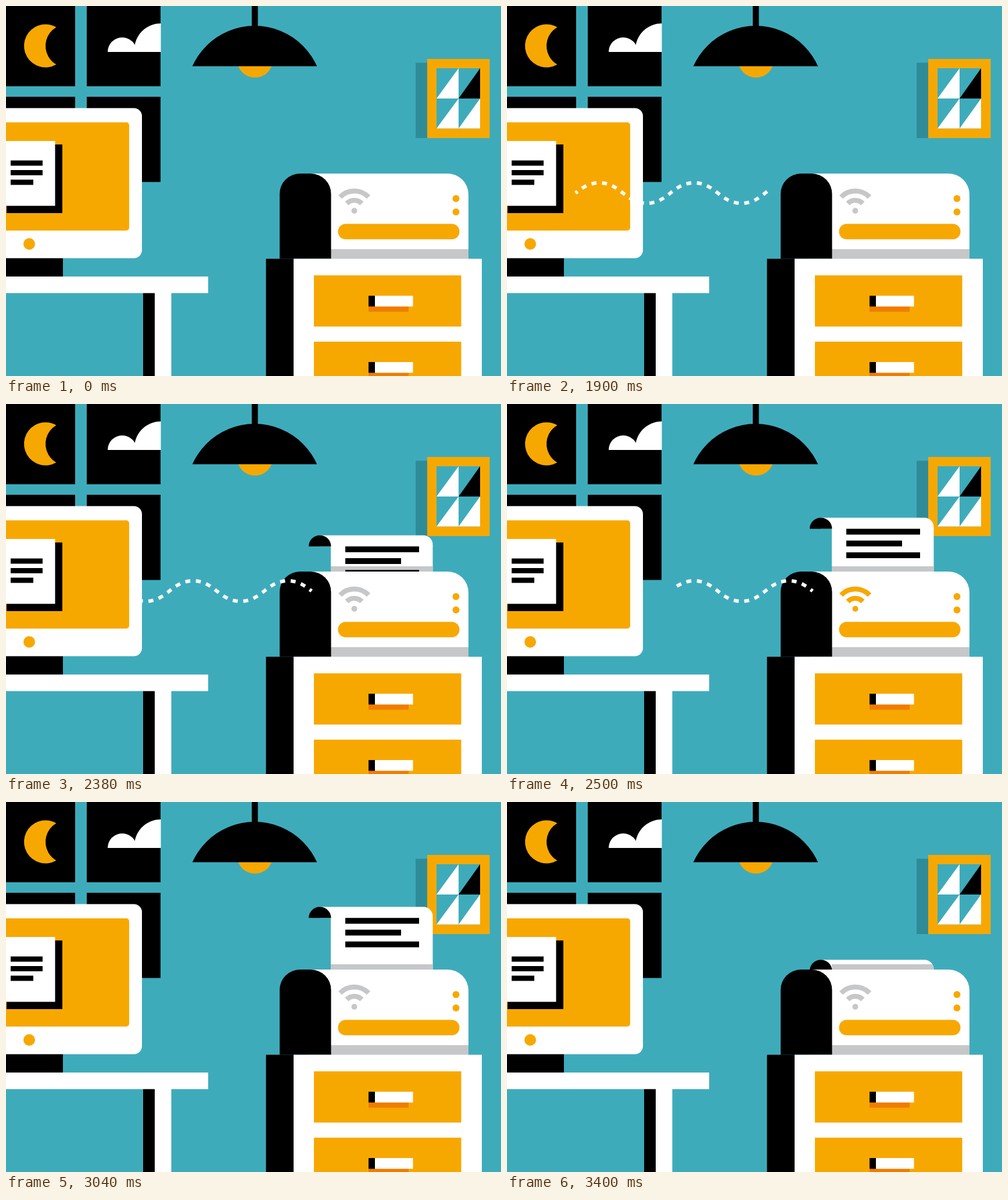
An HTML page with a canvas that plays this animation: 852x636 px, repeating every 3460 ms.

```html
<!DOCTYPE html>
<html lang="en">
<head>
<meta charset="utf-8">
<title>Wireless printing</title>
<style>
  html, body { margin: 0; width: 100%; height: 100%; overflow: hidden; background: #3eabbb; }
  canvas { display: block; }
</style>
</head>
<body>
<canvas id="stage" width="852" height="636"></canvas>
<script>
const ctx = document.getElementById('stage').getContext('2d');
const TEAL = '#3eabbb', ORANGE = '#f7a800', RUST = '#ef7d00', SHADE = '#2e8c99';
const GRAY = '#c6c7c9', BLACK = '#000', WHITE = '#fff';
const LOOP = 3460, HOLD = 1300, STEP = 60;

// Filled box given by its edges
function box(color, l, t, r, b, radii = 0) {
  ctx.fillStyle = color;
  ctx.beginPath();
  ctx.roundRect(l, t, r - l, b - t, radii);
  ctx.fill();
}

function disc(color, x, y, r) {
  ctx.fillStyle = color;
  ctx.beginPath();
  ctx.arc(x, y, r, 0, Math.PI * 2);
  ctx.fill();
}

function poly(color, ...p) {
  ctx.fillStyle = color;
  ctx.beginPath();
  for (let i = 0; i < p.length; i += 2) ctx.lineTo(p[i], p[i + 1]);
  ctx.fill();
}

function clipped(l, t, r, b, draw) {
  ctx.save();
  ctx.beginPath();
  ctx.rect(l, t, r - l, b - t);
  ctx.clip();
  draw();
  ctx.restore();
}

function drawWindow() {
  for (const [l, r] of [[0, 119], [139, 266]]) {
    box(BLACK, l, 0, r, 138);
    box(BLACK, l, 156, r, 302.5);
  }
  const a = Math.PI / 3;
  ctx.fillStyle = ORANGE;
  ctx.beginPath();
  ctx.arc(68, 68.5, 37, a, -a);
  ctx.arc(105, 68.5, 37, -2 * a, 2 * a, true);
  ctx.fill();
  clipped(170, 20, 266.5, 79, () => {
    disc(WHITE, 200, 79, 25);
    disc(WHITE, 266, 75, 45);
  });
}

function drawLamp() {
  box(BLACK, 423, 0, 433.5, 40);
  clipped(390, 103, 470, 130, () => disc(ORANGE, 428.5, 92, 31));
  clipped(315, 30, 540, 103.5, () => disc(BLACK, 428, 151.5, 117.5));
}

function drawPicture() {
  box(SHADE, 705, 97.5, 726, 227);
  box(ORANGE, 725, 91, 832.5, 227);
  box(TEAL, 741, 107, 816, 210.5);
  poly(WHITE, 779, 107, 779, 159, 741, 159);
  poly(BLACK, 816, 107, 816, 159, 779, 159);
  poly(WHITE, 779, 159, 779, 210.5, 741, 210.5);
  poly(WHITE, 816, 159, 816, 210.5, 779, 210.5);
}

function drawDesk() {
  box(BLACK, 236, 493, 256, 636);
  box(WHITE, 256, 493, 284.5, 636);
  box(WHITE, 0, 465, 348, 493.5);
  box(BLACK, 0, 433, 98, 465);
  box(WHITE, -20, 175.5, 234, 433.5, 14);
  box(ORANGE, -20, 200, 212, 386, 5);
  box(BLACK, 1, 238, 97, 356);
  box(WHITE, 0, 232, 84.5, 343.5);
  box(BLACK, 8, 265.5, 63, 274.5);
  box(BLACK, 8, 282, 63, 291);
  box(BLACK, 8, 298.5, 47, 307.5);
  disc(ORANGE, 40, 409, 10);
}

function drawSheet(top) {
  clipped(500, 150, 750, 300, () => {
    box(WHITE, 540, top, 734.5, top + 19, [0, 16, 0, 0]);
    box(WHITE, 559, top + 18, 734.5, 300);
    // The strip of shade stays at the slot and follows the rounded corner
    clipped(559, 279, 735, 300, () => box(GRAY, 540, top, 734.5, 320, [0, 16, 0, 0]));
    box(BLACK, 521, top, 559.5, top + 19, [19, 19, 0, 0]);
    [711, 680, 711].forEach((r, i) => {
      const y = top + 19 + i * 20.2;
      box(BLACK, 584, y, r, y + 10);
    });
  });
}

function drawWifi(color) {
  const x = 599.5, y = 352;
  ctx.strokeStyle = color;
  ctx.lineWidth = 8.5;
  for (const r of [34, 18]) {
    ctx.beginPath();
    ctx.arc(x, y, r, -Math.PI * 0.755, -Math.PI * 0.245);
    ctx.stroke();
  }
  disc(color, x, y, 5);
}

function drawPrinter(lit) {
  box(WHITE, 520, 288, 796, 434.5, [0, 36, 0, 0]);
  box(GRAY, 540, 418, 796, 434.5);
  box(BLACK, 471, 288, 559.5, 434.5, [35, 35, 0, 0]);
  drawWifi(lit ? ORANGE : GRAY);
  disc(ORANGE, 774.5, 331, 6);
  disc(ORANGE, 774.5, 354, 6);
  box(ORANGE, 571.5, 374.5, 780.5, 401, 13);
}

function drawCabinet() {
  box(BLACK, 447.5, 434.5, 495, 636);
  box(WHITE, 495, 434.5, 819, 636);
  for (const y of [463, 577]) {
    box(ORANGE, 530, y, 783.5, y + 88);
    box(RUST, 624, y + 53, 693, y + 62.5);
    box(BLACK, 624, y + 35, 635, y + 53.5);
    box(WHITE, 635, y + 35, 700.5, y + 53.5);
  }
}

// Signal wave as points [x, y, distance along the path]
const HALF = 81.6, START = 118, MID = 321.5, AMP = 17.5, EASE = 0.45;
const wave = [];
for (let m = -1; m < 5; m++) {
  for (let i = 0; i < 80; i++) {
    const t = i / 80, q = 1 - t;
    const u = 3 * EASE * t * q * q + 3 * (1 - EASE) * t * t * q + t * t * t;
    const x = START + HALF * (m + 0.5 + u);
    if (x < START || x > START + 5 * HALF) continue;
    const side = m % 2 ? 1 : -1;
    const y = MID + side * AMP * (1 - 2 * (3 * t * t - 2 * t * t * t));
    const p = wave[wave.length - 1];
    wave.push([x, y, p ? p[2] + Math.hypot(x - p[0], y - p[1]) : 0]);
  }
}
const LENGTH = wave[wave.length - 1][2];
const PITCH = LENGTH / 25, DASH = 8.6;

function pointAt(s) {
  let i = 1;
  while (i < wave.length - 1 && wave[i][2] < s) i++;
  const a = wave[i - 1], b = wave[i], f = (s - a[2]) / (b[2] - a[2]);
  return [a[0] + (b[0] - a[0]) * f, a[1] + (b[1] - a[1]) * f];
}

function drawWave(tail, head) {
  ctx.strokeStyle = WHITE;
  ctx.lineWidth = 6;
  for (let n = 0; n <= 25; n++) {
    const from = Math.max(tail, n * PITCH - DASH / 2);
    const to = Math.min(head, n * PITCH + DASH / 2);
    if (to - from < 0.3) continue;
    ctx.beginPath();
    for (let i = 0; i <= 6; i++) ctx.lineTo(...pointAt(from + (to - from) * i / 6));
    ctx.stroke();
  }
}

function draw(time) {
  const t = time % LOOP;
  const k = t < HOLD ? -1 : Math.floor((t - HOLD) / STEP);

  box(TEAL, 0, 0, 852, 636);
  drawWindow();
  drawLamp();
  drawPicture();
  drawDesk();

  // Sheet rises, rests, then slides back at the same speed
  const travel = Math.min(8, k - 14, 36 - k);
  if (travel > 0) drawSheet(286.4 - 15.15 * travel);

  const lit = k >= 14 && k < 29 && Math.floor((k - 14) / 3) % 2 === 0;
  drawPrinter(lit);
  drawCabinet();

  if (k >= 0) {
    const d = k - 20;
    const scale = LENGTH / 446;
    const tail = k < 14 ? 0 : Math.max(0, 182.5 + 32.2 * d + 0.15 * d * d);
    drawWave(tail * scale, Math.min(LENGTH, 33 * (k + 1) * scale));
  }
}

const begin = performance.now();
function tick() {
  draw(performance.now() - begin);
  requestAnimationFrame(tick);
}
tick();
</script>
</body>
</html>
```
